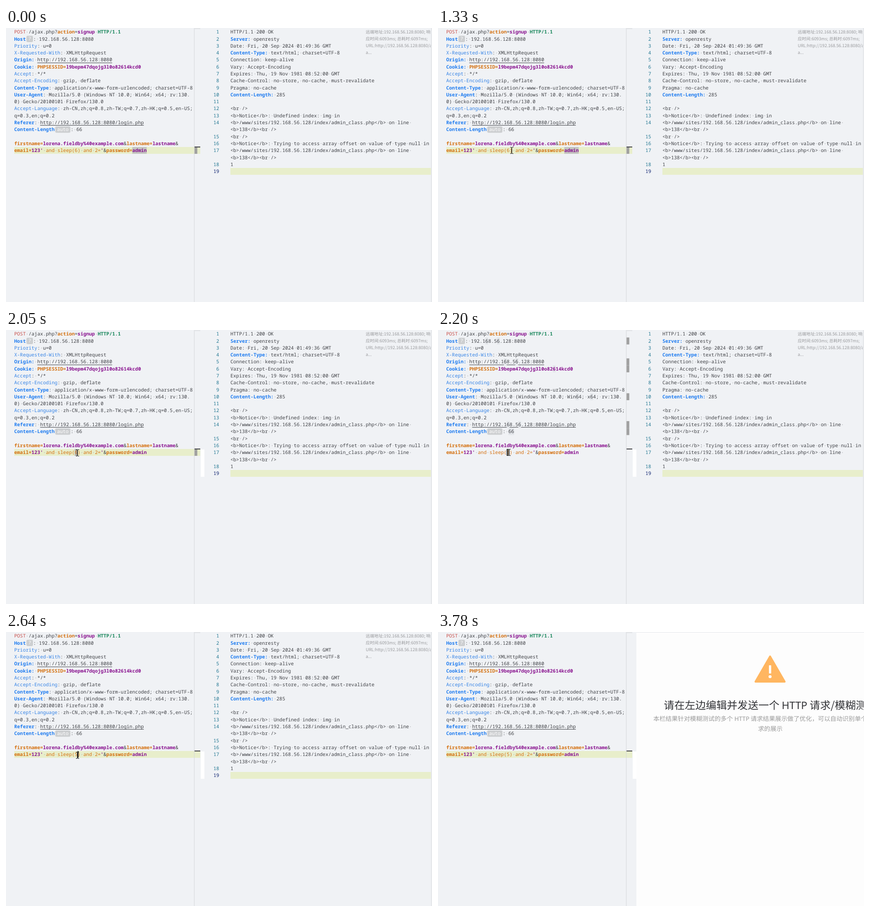
An HTML page with a canvas that plays this animation: 932x601 px, repeating every 8 s.

```html
<!DOCTYPE html>
<html lang="zh">
<head>
<meta charset="utf-8">
<title>HTTP request editor</title>
<style>
html, body { margin: 0; width: 100%; height: 100%; overflow: hidden; background: #f0f2f5; }
canvas { display: block; }
</style>
</head>
<body>
<canvas id="stage" width="932" height="601"></canvas>
<script>
const ctx = document.getElementById('stage').getContext('2d');
const LOOP = 8000;
const CHAR = 6.3, LINE = 15.29, TOP = 1.1;
const LEFT = 18, RIGHT = 491, EDIT_ROW = 17;
const MONO = '10.5px "Noto Sans Mono", monospace';
const CJK = '"Noto Sans CJK SC", "Noto Sans CJK", sans-serif';

// Style keys: colour and weight
const styles = {
  d: ['#404247'],
  b: ['#1f7cf0', 'bold'],
  l: ['#3583e6'],
  r: ['#c9504b'],
  g: ['#16855a', 'bold'],
  o: ['#d4700f', 'bold'],
  q: ['#d4700f', '500'],
  p: ['#8a1590', 'bold'],
  u: ['#404247', '', 'underline'],
  n: ['#237893'],
  a: ['#0b216f']
};

// Each row is a flat list of style key and text; "tag" is an inline badge
const request = digit => [
  ['r', 'POST', 'd', ' /ajax.php?', 'o', 'action', 'd', '=', 'p', 'signup', 'd', ' ', 'g', 'HTTP/1.1'],
  ['b', 'Host', 'tag', '?', 'd', ': 192.168.56.128:8080'],
  ['l', 'Priority', 'd', ': u=0'],
  ['l', 'X-Requested-With', 'd', ': XMLHttpRequest'],
  ['b', 'Origin:', 'd', ' ', 'u', 'http://192.168.56.128:8080'],
  ['b', 'Cookie:', 'd', ' ', 'o', 'PHPSESSID=', 'p', 'l9bepm47dqojg3l0o82614kcd0'],
  ['l', 'Accept', 'd', ': */*'],
  ['l', 'Accept-Encoding', 'd', ': gzip, deflate'],
  ['b', 'Content-Type', 'd', ': application/x-www-form-urlencoded; charset=UTF-8'],
  ['b', 'User-Agent', 'd', ': Mozilla/5.0 (Windows NT 10.0; Win64; x64; rv:130.'],
  ['d', '0) Gecko/20100101 Firefox/130.0'],
  ['l', 'Accept-Language', 'd', ': zh-CN,zh;q=0.8,zh-TW;q=0.7,zh-HK;q=0.5,en-US;'],
  ['d', 'q=0.3,en;q=0.2'],
  ['b', 'Referer', 'd', ': ', 'u', 'http://192.168.56.128:8080/login.php'],
  ['b', 'Content-Length', 'tag', 'auto', 'd', ': 66'],
  [],
  ['o', 'firstname=', 'p', 'lorena.fieldby%40example.com', 'd', '&', 'o', 'lastname=', 'p', 'lastname', 'd', '&'],
  ['o', 'email=', 'p', "123'", 'q', ` and sleep(${digit}) and 2=`, 'p', "'", 'd', '&',
    'o', 'password=', 'p', 'admin']
];

const path = '<b>/www/sites/192.168.56.128/index/admin_class.php</b> on line ';
const response = [
  ['d', 'HTTP/1.1 200 OK'],
  ['b', 'Server:', 'd', ' openresty'],
  ['d', 'Date: Fri, 20 Sep 2024 01:49:36 GMT'],
  ['b', 'Content-Type:', 'd', ' text/html; charset=UTF-8'],
  ['d', 'Connection: keep-alive'],
  ['d', 'Vary: Accept-Encoding'],
  ['d', 'Expires: Thu, 19 Nov 1981 08:52:00 GMT'],
  ['d', 'Cache-Control: no-store, no-cache, must-revalidate'],
  ['d', 'Pragma: no-cache'],
  ['b', 'Content-Length:', 'd', ' 285'],
  [],
  ['d', '<br />'],
  ['d', '<b>Notice</b>: Undefined index: img in'],
  ['d', path],
  ['d', '<b>138</b><br />'],
  ['d', '<br />'],
  ['d', '<b>Notice</b>: Trying to access array offset on value of type null in'],
  ['d', path],
  ['d', '<b>138</b><br />'],
  ['d', '1'],
  []
];
const wrapped = [14, 18];
const matchRows = [1, 4, 5, 9, 13, 14];

// Each step changes some of the state that came before it
const steps = [
  [0, { digit: 6, band: true, word: true, mark: true }],
  [500, { mouse: [149, 170] }],
  [620, { mouse: [225, 269] }],
  [920, { mouse: [213, 263] }],
  [1070, { mouse: [195, 265] }],
  [1200, { mouse: [173, 267] }],
  [1330, { mouse: [161, 268] }],
  [1480, { mouse: [156, 269] }],
  [1760, { rightCaret: true }],
  [1900, { rightCaret: false, word: false, mark: false, caret: 157, thumb: true }],
  [2050, { caret: 0, mark: true, selected: true }],
  [2200, { mark: false, band: false, match: true, caret: 151, mouse: [155, 268] }],
  [2490, { mouse: [156, 270] }],
  [2640, { digit: 5, band: true, selected: false, match: false, caret: 157 }],
  [2790, { mouse: [157, 228] }],
  [2940, { mouse: [92, 62] }],
  [3090, { mouse: null }],
  [3210, { caret: 0 }],
  [3780, { empty: true }]
];

const rowTop = row => TOP + row * LINE;

function rect(x, y, w, h, color) {
  ctx.fillStyle = color;
  ctx.fillRect(x, y, w, h);
}

function label(text, x, y, font, color, align = 'left') {
  ctx.font = font;
  ctx.fillStyle = color;
  ctx.textAlign = align;
  ctx.fillText(text, x, y);
}

function badge(text, x, top) {
  const w = text.length * CHAR + 8;
  ctx.fillStyle = '#cdcfd1';
  ctx.beginPath();
  ctx.roundRect(x + 1.5, top + 0.6, w, 14, 3);
  ctx.fill();
  label(text, x + 5.5, top + 11, MONO, '#ffffff');
  return w + 2;
}

function drawRow(parts, x, row, match) {
  const top = rowTop(row), base = top + 11.2;
  for (let i = 0; i < parts.length; i += 2) {
    const text = parts[i + 1];
    if (parts[i] === 'tag') {
      x += badge(text, x, top);
      continue;
    }
    const [color, weight = '', line] = styles[parts[i]];
    if (line) rect(x, Math.round(top + 13.5), text.length * CHAR, 1, color);
    for (const c of text) {
      if (match && c === '6') rect(x, top, CHAR, LINE, '#e3e6ea');
      if (c === ' ') rect(x + 2.5, top + 7.2, 1.3, 1.3, '#a6a8ab');
      else label(c, x, base, `${weight} ${MONO}`, color);
      x += CHAR;
    }
  }
}

function drawRequest(s) {
  const y = Math.round(rowTop(EDIT_ROW));
  if (s.band) rect(LEFT, y, 407, 15, '#e8eecb');
  if (s.word) rect(276.3, y, 31.5, 15, '#c3c5bf');
  if (s.selected) rect(150.3, y, CHAR, 15, '#b5b7b2');
  request(s.digit).forEach((parts, i) => drawRow(parts, LEFT, i, s.match && matchRows.includes(i)));

  rect(411.5, 0, 1, 601, '#d3d5d9');
  rect(413, 1, 12, 1, '#d3d5d9');
  if (s.mark) rect(412.5, 262, 6, 14, '#a0a0a0');
  if (s.match) for (const r of matchRows) rect(412.5, rowTop(r), 6, LINE, '#a0a0a0');
  rect(412.5, 260, 12.5, 2, '#45464a');
  if (s.thumb) rect(426, 262, 8, 60, '#ffffff');
  if (s.caret) rect(s.caret - 0.5, y, 2, 15, '#111111');
}

function drawResponse(s) {
  rect(RIGHT, 307, 439, 15, '#e8eecb');
  let number = 0;
  response.forEach((parts, i) => {
    drawRow(parts, RIGHT, i);
    if (wrapped.includes(i)) return;
    const digits = String(++number);
    drawRow([number === 19 ? 'a' : 'n', digits], 466.4 - digits.length * CHAR, i);
  });
  ['远端地址:192.168.56.128:8080; 响', '应时间:6093ms; 总耗时:6097ms;',
    'URL:http://192.168.56.128:8080/aj', 'a...']
    .forEach((t, i) => label(t, 787, 11.5 + i * 15, `9.3px ${CJK}`, '#999a9d'));
  rect(929.5, 0, 2.5, 601, '#e6e8eb');
  if (s.rightCaret) rect(RIGHT, 307, 2, 15, '#111111');
}

function drawEmpty() {
  rect(434, 0, 498, 601, '#fdfdfd');
  rect(434, 0, 498, 1, '#e4e6e9');

  ctx.fillStyle = ctx.strokeStyle = '#ffb660';
  ctx.lineWidth = 4;
  ctx.lineJoin = 'round';
  ctx.beginPath();
  ctx.moveTo(726.5, 53.5);
  ctx.lineTo(758.5, 109);
  ctx.lineTo(694.5, 109);
  ctx.closePath();
  ctx.fill();
  ctx.stroke();
  ctx.fillStyle = '#ffffff';
  ctx.beginPath();
  ctx.roundRect(724, 73, 5, 18, 1);
  ctx.arc(726.5, 98, 3.3, 0, Math.PI * 2);
  ctx.fill();

  const big = `23px ${CJK}`, small = `13.4px ${CJK}`;
  const dark = '#323337', grey = '#9b9b9b';
  label('请在左边编辑并发送一个', 494, 168.5, big, dark);
  label('HTTP', 752, 168.5, '22.6px "Noto Sans", sans-serif', dark);
  label('请求/模糊测试', 813, 168.5, big, dark);
  label('本栏结果针对模糊测试的多个', 471, 195, small, grey);
  label('HTTP', 648.5, 195, '13.2px "Noto Sans", sans-serif', grey);
  label('请求结果展示做了优化，可以自动识别单个', 684, 195, small, grey);
  label('求的展示', 727, 217, small, grey, 'center');
}

function drawMouse([x, y]) {
  rect(x - 0.5, y - 6, 1.6, 13, '#1a1a1a');
  for (const end of [y - 7, y + 7]) {
    rect(x - 3, end, 3, 1, '#1a1a1a');
    rect(x + 1, end, 3, 1, '#1a1a1a');
  }
}

function draw(s) {
  ctx.textRendering = 'geometricPrecision';
  rect(0, 0, 932, 601, '#f0f2f5');
  drawRequest(s);
  if (s.empty) drawEmpty();
  else drawResponse(s);
  if (s.mouse) drawMouse(s.mouse);
}

let shown = 0;
function tick(now) {
  const t = now % LOOP;
  const active = steps.filter(([at]) => at <= t);
  if (active.length !== shown) {
    shown = active.length;
    draw(Object.assign({}, ...active.map(([, change]) => change)));
  }
  requestAnimationFrame(tick);
}
tick(performance.now());
</script>
</body>
</html>
```
